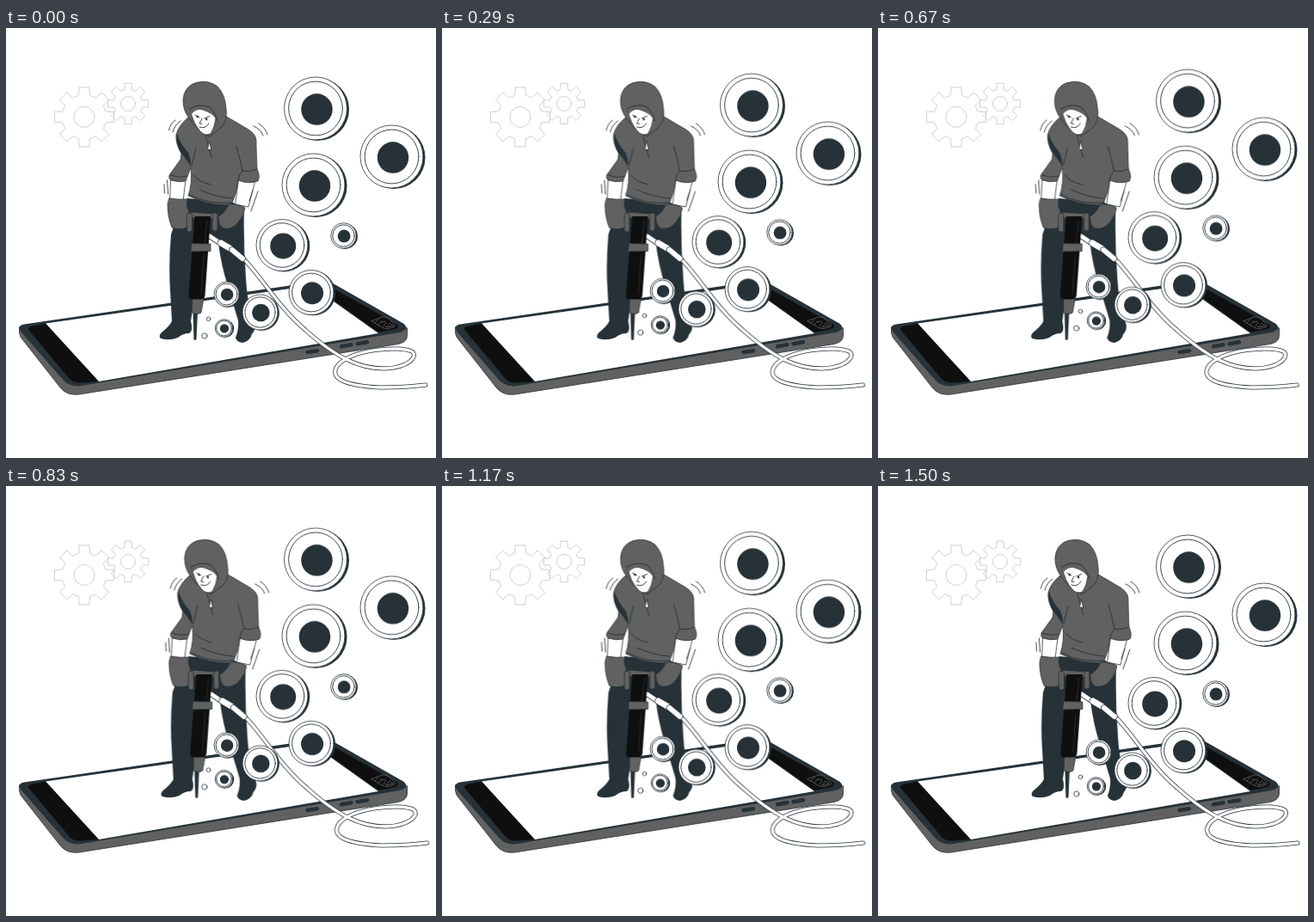
An HTML page for the animation above (1.54 s loop, 500 by 500 pixels).

```html
<!DOCTYPE html>
<html lang="en">
<head>
<meta charset="utf-8">
<title>Mining coins</title>
<style>
  html, body { margin: 0; width: 100%; height: 100%; overflow: hidden; background: #fff; }
  svg { display: block; width: 100%; height: 100%; }
  svg * { stroke-linejoin: round; stroke-linecap: round; }

  .ink { fill: #263238; }
  .black { fill: #0f0f0f; }
  .grey { fill: #616161; stroke: #263238; stroke-width: .8; }
  .white { fill: #fff; stroke: #263238; stroke-width: .8; }
  .line { fill: none; stroke: #263238; stroke-width: .9; }
  .gear { fill: none; stroke: #c4c4c4; stroke-width: .8; }
  .etch { fill: none; stroke: #616161; stroke-width: .8; }

  /* Paused, so that --t alone picks the pose */
  .shake, .float {
    animation: shake 1500ms linear infinite paused;
    animation-delay: calc(var(--t, 22) * -1ms);
  }
  .float { animation-name: float; }

  @keyframes float {
    0%, 100% { transform: translateY(.3px); }
    50% { transform: translateY(-9.6px); }
  }
  @keyframes shake {
    0%, 100% { transform: translateX(0); }
    10%, 90% { transform: translateX(-1px); }
    20%, 80% { transform: translateX(2px); }
    30%, 50%, 70% { transform: translateX(-4px); }
    40%, 60% { transform: translateX(4px); }
  }
</style>
</head>
<body>
<svg viewBox="0 0 500 500">
  <g id="gears" class="gear"></g>

  <g id="phone">
    <path class="grey" d="M15.500 348V354Q16 359 19 362L63 418Q71 428 85 426L456 367.500Q467 365 466.500 357V349Z"/>
    <path class="ink" d="M21 344.500L364 294.500Q374 293 382 298L462 343.500Q470 350 458 354L88 416Q75 418 67 410L18 354Q12 346.500 21 344.500Z"/>
    <path fill="#fff" d="M46 343.500L355 299.500L433 355L108 411Z"/>
    <path class="black" d="M29 347L46 343.500L107.500 411L86 412.500Q78 413 73 407L27 352Q24 348 29 347Z"/>
    <path class="black" d="M358 300L366 299Q373 298 379 302L454 344Q458 347 453 350L433 354Z"/>
    <path class="etch" d="M425 340.500L438 336Q442 335 445 338L452 344.500Q454 347 450 348L444 349.500Q440 350 437 348Z
      M429 343L433 338.500M433 345L437 340.500M436 342L441 341M439 347L442 342M442 347.500L446 343L450 346Z"/>
    <path class="line" stroke-width="4" style="stroke-width:4.500" d="M350.500 377L362 375.200M390 370.200L401.500 368.300M408.500 367.200L420 365.300"/>
  </g>

  <g class="shake">
    <g id="legs">
      <path class="ink" d="M211 198Q198 220 192 240Q189 275 191 305L193 341Q190 347 181 354Q177 358 180 361Q190 364 200 360Q206 355 213 355Q218 352 215 341L221 300L236 240L247 249Q250 275 258 300L270 340Q271 351 267 360Q268 365 275 366Q284 364 286 356Q292 349 288 341Q280 315 279 290Q276 250 277 210L264 203Z"/>
    </g>

    <g id="arms">
      <path class="white" d="M192 174L209 177L206 201L191 199Z"/>
      <path class="white" d="M271 176L290 177L282 208L267 205Z"/>
    </g>

    <g id="hoodie">
      <path class="grey" d="M212 104Q201 113 198 124Q197 134 204 146L203 153L190 171Q189 176 192 177Q201 180 209 178Q212 170 215 162Q217 181 212 195Q235 207 262 206Q269 191 270 177Q282 182 293 178Q296 172 292 164Q291 142 291 131Q291 124 282 118L253 101Z"/>
      <path class="ink" d="M199 123Q203 135 212 145Q215 152 215 161Q209 151 204 146Q197 134 199 123Z"/>
      <path class="line" d="M192 171Q201 175 211 172M270 177Q271 170 275 166Q283 168 292 164M275 166Q272 150 268 138M218 171Q224 179 238 182M225 188Q245 197 263 198M221 140L216 160M214 194Q236 206 264 203M232 125L239 150M254 102Q250 116 237 126"/>
      <path class="grey" d="M213 105Q206 96 206 84Q207 68 221 63.500Q236 60 246 68Q255 77 256 94Q258 108 250 116L237 126Q221 118 213 105Z"/>
      <path class="white" d="M214 94Q226 88 238 94L244 105Q243 115 238 123Q231 126 226 120Q218 112 214 94Z"/>
      <path fill="#616161" d="M214 94Q225 86 237 91Q244 98 245 106Q238 98 230 96Q222 93 216 100Z"/>
      <path class="line" d="M220 101L225 104M231 105L237 102.500M228 105L225 111L228 111.500M225 115Q232 118 236 111M214 94Q225 87 237 92Q243 98 246 108"/>
      <path class="ink" d="M221.500 103a1.200 1.500 0 1 0 2.400 0a1.200 1.500 0 1 0-2.400 0M232 106a1.200 1.500 0 1 0 2.400 0a1.200 1.500 0 1 0-2.400 0"/>
      <path class="white" d="M236.500 132L234.500 141L238.500 141.500Z"/>
    </g>

    <g id="cable"></g>

    <g id="drill">
      <path class="ink" d="M217.500 330H223L221.500 362Q220 364 218.500 362Z"/>
      <path class="grey" d="M217 314H230L227 331Q222 334 216.500 331Z"/>
      <path class="grey" d="M215 214L242 216V222L214 221Z"/>
      <path class="black" d="M219.500 219H238L231.500 311Q231 315 227 315.500H216Q212 315 212.500 311Z"/>
      <path class="etch" style="stroke:#333" d="M234 224L231 250M230 264L227 309"/>
      <path class="grey" d="M216 250.500L238 251V259.500L215 260Z"/>
    </g>

    <g id="gloves">
      <path class="grey" d="M190 198Q201 200 211 199Q209 206 213 214V231Q203 236 193 232Q188 220 188 205Z"/>
      <path class="grey" d="M259 205Q269 204 278 209Q277 218 271 225Q264 235 253 233Q247 230 247 219Q255 215 259 205Z"/>
      <rect class="grey" x="210.500" y="215" width="6" height="22" rx="2.500"/>
      <rect class="grey" x="240" y="215" width="6" height="21" rx="2.500"/>
    </g>

    <path class="line" d="M189.500 119Q191 111 197 107M194 121Q196 113 203 108M288 114Q297 118 299 125M294 111Q302 116 304 124
      M184 182L184.500 192M187.500 177L188.500 193M187 240M287 189L283 201M293 190L285 213"/>
  </g>

  <g id="coins" class="float"></g>
</svg>

<script>
  const $ = id => document.getElementById(id);
  const circle = (x, y, r, cls) => `<circle cx="${x}" cy="${y}" r="${r}" class="${cls}"/>`;

  function gear(x, y, outer, root, hole) {
    const points = [];
    for (let i = 0; i < 8; i++) {
      for (const [r, turn] of [[root, -.25], [outer, -.17], [outer, .17], [root, .25]]) {
        const a = i * Math.PI / 4 + turn;
        points.push((x + r * Math.cos(a)).toFixed(1) + ',' + (y + r * Math.sin(a)).toFixed(1));
      }
    }
    return `<polygon points="${points.join(' ')}"/>` + circle(x, y, hole, 'gear');
  }

  function coin([x, y, r]) {
    const depth = 1 + r / 24;
    return circle(x + depth, y + depth * .4, r, 'ink') +
      circle(x, y, r, 'white') +
      circle(x, y, r * .86, 'line') +
      circle(x + r * .04, y + r * .03, r * .5, 'ink');
  }

  function tube(d, width) {
    const stroke = (color, w) =>
      `<path d="${d}" fill="none" stroke="${color}" stroke-width="${w}"/>`;
    return stroke('#263238', width + 1.6) + stroke('#fff', width);
  }

  $('gears').innerHTML = gear(91, 103.5, 35, 26, 12) + gear(142, 88, 24, 17, 8.5);

  $('cable').innerHTML =
    tube('M275 267C298 290 316 324 348 351C384 383 410 396 440 396C468 395 480 382 472 376C456 369 402 374 386 392C374 408 396 416 435 418Q465 418 488 415', 3.4) +
    tube('M237 242L249 250', 5) +
    tube('M250 250L261 256.500', 7) +
    tube('M263 258L275 268', 6);

  const coins = [
    [360, 93.5, 36.5], [448.5, 149.5, 36.5], [357.5, 182.5, 36.5],
    [321, 252.5, 30], [392.5, 241.5, 14.8], [355, 307.5, 26],
    [295.5, 330.5, 20.5], [256.5, 309.5, 14.5], [253.5, 349, 10.3]
  ];
  $('coins').innerHTML = coins.map(coin).join('') +
    circle(235.5, 338.3, 2.3, 'white') + circle(230.8, 358, 3.1, 'white');

  // 24 pictures a second; the last one is held until the loop ends
  const LOOP = 1540, STEP = 1000 / 24, LAST = 36, LEAD = 22;
  function draw() {
    const n = Math.min(LAST, Math.floor((performance.now() % LOOP + 5) / STEP));
    document.documentElement.style.setProperty('--t', (n * STEP + LEAD).toFixed(2));
    requestAnimationFrame(draw);
  }
  draw();
</script>
</body>
</html>
```
